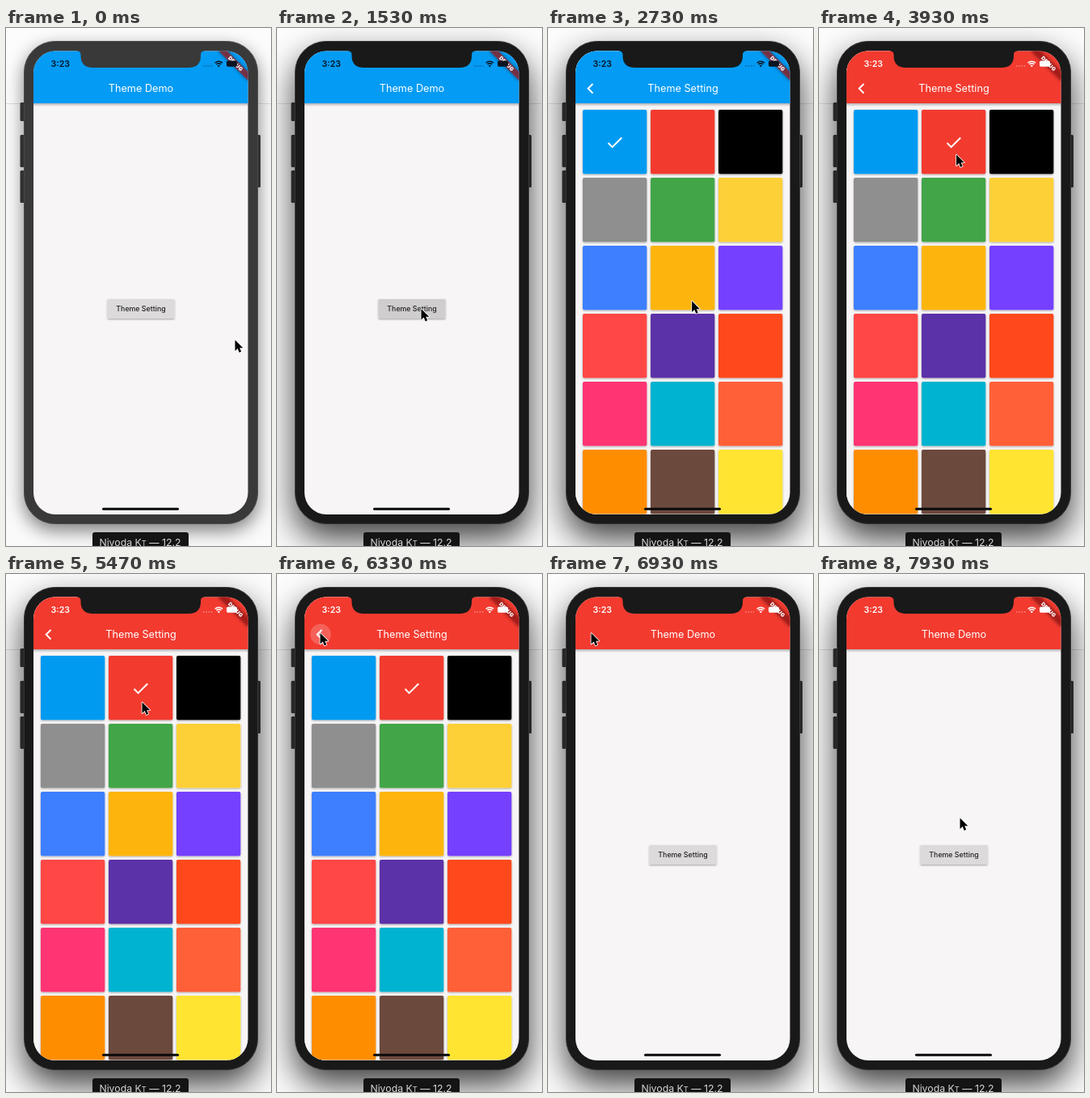
Recreate the animation shown at these times as an HTML page. Size 328x640 px, loop 8000 ms.

```html
<!DOCTYPE html>
<html lang="en">
<head>
<meta charset="utf-8">
<title>Theme Demo</title>
<style>
html, body { margin: 0; width: 100%; height: 100%; overflow: hidden; background: #fdfcfd; }
svg { display: block; width: 100vw; height: 100vh; }
text { font-family: Inter, Roboto, sans-serif; text-anchor: middle; }
.title { font-size: 12.7px; fill: #fff; }
</style>
</head>
<body>
<svg viewBox="0 0 328 640" xmlns="http://www.w3.org/2000/svg">
  <defs>
    <filter id="soft" filterUnits="userSpaceOnUse" x="-80" y="-80" width="490" height="820"><feGaussianBlur stdDeviation="11"/></filter>
    <filter id="deep" filterUnits="userSpaceOnUse" x="-80" y="-80" width="490" height="820"><feGaussianBlur stdDeviation="20"/></filter>
    <filter id="lift" x="-20%" y="-40%" width="140%" height="200%"><feDropShadow dx="0" dy="1" stdDeviation=".8" flood-opacity=".35"/></filter>
    <filter id="blur2" x="-20%" y="-100%" width="140%" height="300%"><feGaussianBlur stdDeviation="2"/></filter>
    <linearGradient id="barShade" x1="0" y1="0" x2="0" y2="1">
      <stop offset="0" stop-opacity=".28"/><stop offset="1" stop-opacity="0"/>
    </linearGradient>
    <linearGradient id="edgeShade">
      <stop offset="0" stop-opacity="0"/><stop offset=".6" stop-opacity=".08"/><stop offset="1" stop-opacity=".36"/>
    </linearGradient>
    <clipPath id="screen"><rect x="34" y="28.5" width="265.5" height="572.5" rx="27"/></clipPath>
    <clipPath id="pageClip"><rect x="34" y="28" width="266" height="574"/></clipPath>
  </defs>

  <rect width="328" height="640" fill="#fdfcfd"/>
  <rect y="93" width="328" height="547" fill="#fbfafb"/>
  <rect y="93" width="328" height="1" fill="#dedddf"/>

  <rect id="idleShadow" x="22" y="24" width="290" height="597" rx="38" opacity=".5" filter="url(#soft)"/>
  <rect id="focusShadow" x="22" y="34" width="290" height="597" rx="38" opacity=".75" filter="url(#deep)"/>

  <g id="keys">
    <rect x="17.5" y="92" width="7" height="23" rx="1.5"/>
    <rect x="17.5" y="132" width="7" height="40" rx="1.5"/>
    <rect x="17.5" y="176" width="7" height="40" rx="1.5"/>
    <rect x="308" y="132" width="7" height="65" rx="1.5"/>
  </g>
  <rect id="shell" x="22.5" y="16.5" width="289" height="596" rx="38"/>

  <g clip-path="url(#screen)">
    <g id="home">
      <rect x="34" y="28" width="266" height="574" fill="#f7f5f6"/>
      <rect x="34" y="93" width="266" height="4" fill="url(#barShade)"/>
      <rect class="bar" x="34" y="28" width="266" height="65"/>
      <text class="title" x="167" y="79">Theme Demo</text>
      <rect x="125.5" y="335" width="83" height="24" rx="1.3" fill="#dcdadb" filter="url(#lift)"/>
      <rect id="press" x="125.5" y="335" width="83" height="24" rx="1.3"/>
      <text x="167" y="350" font-size="8.8" font-weight="500" fill="#222">Theme Setting</text>
    </g>
    <g id="setting">
      <rect x="22" y="28" width="12" height="574" fill="url(#edgeShade)"/>
      <g clip-path="url(#pageClip)">
        <rect x="34" y="28" width="266" height="574" fill="#f7f5f6"/>
        <g id="tiles"></g>
        <path id="check" fill="#fff" d="M9 16.2L4.8 12l-1.4 1.4L9 19 21 7l-1.4-1.4z"/>
        <rect x="34" y="93" width="266" height="4" fill="url(#barShade)"/>
        <rect class="bar" x="34" y="28" width="266" height="65"/>
        <circle id="ripple" cx="54" cy="74.5" fill="#fff"/>
        <path d="M55.5 69L49.7 74.8L55.5 80.6" fill="none" stroke="#fff" stroke-width="2"/>
        <text class="title" x="167" y="79">Theme Setting</text>
      </g>
    </g>

    <g transform="translate(299.5 28.5) rotate(45)">
      <rect x="-26" y="18" width="52" height="7.7" opacity=".5" filter="url(#blur2)"/>
      <rect x="-26" y="18" width="52" height="7.7" fill="#b71c1c" fill-opacity=".63"/>
      <text y="24.2" font-size="6.5" font-weight="900" fill="#fff">DEBUG</text>
    </g>

    <g id="status" fill="currentColor">
      <text x="67.3" y="48" font-size="10.6" font-weight="600">3:23</text>
      <g opacity=".4">
        <circle cx="245" cy="46.8" r=".9"/><circle cx="248.2" cy="46.8" r=".9"/>
        <circle cx="251.4" cy="46.8" r=".9"/><circle cx="254.6" cy="46.8" r=".9"/>
      </g>
      <path d="M258.6 43.2A6.6 6.6 0 0 1 268 43.2M260.4 45.1A4 4 0 0 1 266.2 45.1" fill="none" stroke="currentColor" stroke-width="1.5"/>
      <path d="M263.3 48.3L261.6 46.6A2.4 2.4 0 0 1 265 46.6Z"/>
      <rect x="273" y="40.5" width="13" height="7.2" rx="1.8"/>
      <path d="M286.8 42.8q1.2 1.3 0 2.6z"/>
    </g>
    <rect x="119" y="592.8" width="95" height="3" rx="1.5" fill="#0b0b0b"/>
  </g>

  <path id="notch" d="M88 27V28.5Q92.5 28.5 92.5 33V34Q92.5 49 107.5 49H226Q241 49 241 34V33Q241 28.5 245.5 28.5V27Z"/>

  <path d="M107 640V626q0-3 3-3H223q3 0 3 3V640Z" fill="#141414"/>
  <text x="166" y="640.3" font-size="12.3" fill="#d6d6d6">Nivoda K<tspan font-size="9.3">T</tspan> — 12.2</text>

  <path id="cursor" d="M0 0V13.6L3.2 10.6L5.2 15.4L7.7 14.3L5.7 9.8H9.8Z" stroke="#fff" stroke-width="1.6" stroke-linejoin="round" paint-order="stroke"/>
</svg>
<script>
const LOOP = 8000, PAGE = 265.5;
const FOCUS = 1070, PRESS = 1450, PUSH = 1680, PICK = 3610, TAP = 6250, POP = 6354, SLIDE = 400;
const BLUE = [3, 155, 244], RED = [242, 58, 47];
const COLORS = ["#039bf1", "#f23a2f", "#000", "#8f8f8f", "#43a547", "#fdd038", "#3c7fff", "#fdb509", "#7440ff",
  "#ff4745", "#5c30a8", "#ff4a1a", "#ff3473", "#00b3d0", "#ff6138", "#ff8d00", "#6c4a3d", "#ffe431"];

// Pointer moves: start, end, x, y
const MOVES = [
  [0, 0, 283.5, 385.5],
  [330, 960, 178.5, 347],
  [2668, 3130, 170, 156.5],
  [4100, 4250, 168.5, 158.5],
  [5560, 6050, 53.5, 73],
  [7570, 7930, 174.5, 301.5]
];

const $ = id => document.getElementById(id);
const set = (id, attrs) => { for (const k in attrs) $(id).setAttribute(k, attrs[k]); };
const clamp = v => Math.min(1, Math.max(0, v));
const ramp = (t, start, length) => clamp((t - start) / length);
const mix = (a, b, k) => a + (b - a) * k;
const smooth = k => k * k * (3 - 2 * k);
const bez = (a, b, u) => 3 * (1 - u) ** 2 * u * a + 3 * (1 - u) * u * u * b + u ** 3;

// Cubic curve (.35, .91, .33, .97): quick start, long settle
function settle(x) {
  if (x <= 0 || x >= 1) return clamp(x);
  let lo = 0, hi = 1;
  for (let i = 0; i < 24; i++) {
    const u = (lo + hi) / 2;
    if (bez(.35, .33, u) < x) lo = u; else hi = u;
  }
  return bez(.91, .97, lo);
}

const tileAt = i => [43 + i % 3 * 84, 101 + Math.floor(i / 3) * 84];
$("tiles").innerHTML = COLORS.map((color, i) => {
  const [x, y] = tileAt(i);
  return `<rect x="${x}" y="${y}" width="79.3" height="79.3" rx="2" fill="${color}" filter="url(#lift)"/>`;
}).join("");

function pointer(t) {
  let [, , x, y] = MOVES[0];
  for (const [start, end, tx, ty] of MOVES.slice(1)) {
    const k = smooth(ramp(t, start, end - start));
    x = mix(x, tx, k);
    y = mix(y, ty, k);
  }
  return [x, y];
}

function draw(t) {
  const focused = t >= FOCUS, picked = t >= PICK;
  set("idleShadow", { visibility: focused ? "hidden" : "visible" });
  set("focusShadow", { visibility: focused ? "visible" : "hidden" });
  const body = focused ? "#191919" : "#393939";
  set("shell", { fill: body, stroke: focused ? "#333" : "#4a4a4a" });
  set("notch", { fill: body });
  set("keys", { fill: focused ? "#262728" : "#313131" });

  const shown = settle(ramp(t, PUSH, SLIDE)) - settle(ramp(t, POP, SLIDE));
  set("home", { transform: `translate(${-PAGE / 3 * shown} 0)` });
  set("setting", {
    transform: `translate(${PAGE * (1 - shown)} 0)`,
    visibility: shown > 0 ? "visible" : "hidden"
  });

  const k = ramp(t, PICK, 200);
  const color = `rgb(${BLUE.map((c, i) => Math.round(mix(c, RED[i], k)))})`;
  document.querySelectorAll(".bar").forEach(bar => bar.setAttribute("fill", color));
  set("status", { color: k > .4 ? "#fff" : "#0a1420" });

  const [x, y] = tileAt(picked ? 1 : 0);
  set("check", { transform: `translate(${x + 27.3} ${y + 28}) scale(1.03)` });

  set("press", { opacity: .06 * (ramp(t, PRESS, 80) - ramp(t, PUSH, 250)) });
  const grow = ramp(t, TAP, 200);
  set("ripple", { r: 20 * Math.sqrt(grow), opacity: .2 * ramp(t, TAP, 70) });

  set("cursor", { transform: `translate(${pointer(t)})` });
}

function tick() {
  draw(performance.now() % LOOP);
  requestAnimationFrame(tick);
}
tick();
</script>
</body>
</html>
```
